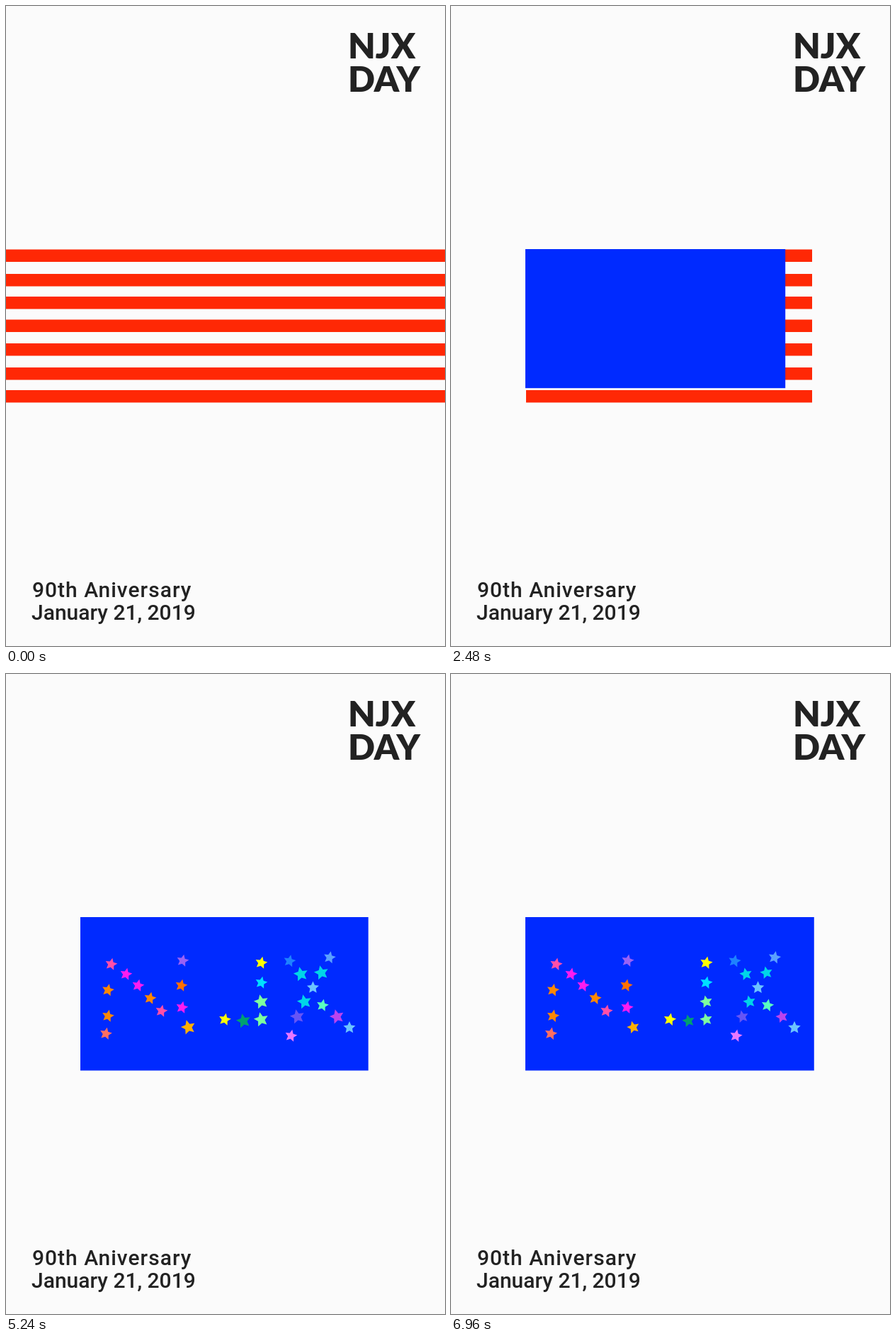
Recreate the animation shown at these times as an HTML page. Size 620 px wide and 903 px high, loop 7 s.

```html
<!DOCTYPE html>
<html lang="en">
<head>
<meta charset="utf-8">
<title>NJX Day</title>
<style>
  html, body { margin: 0; height: 100%; overflow: hidden; background: #fbfbfb; }
  svg { display: block; width: 620px; height: 903px; }
  text { fill: #222; }
  .title { font: 900 50px Lato, sans-serif; }
  .date { font: 500 30px Roboto, sans-serif; }
</style>
</head>
<body>
<svg viewBox="0 0 620 903">
  <g id="stripes" fill="#ff2805"></g>
  <rect id="field" x="105" y="343" fill="#002aff"/>
  <g id="stars"></g>
  <text class="title" x="483" y="74">NJX</text>
  <text class="title" x="483" y="121">DAY</text>
  <text class="date" x="37" y="834" letter-spacing="1">90th Aniversary</text>
  <text class="date" x="36" y="866">January 21, 2019</text>
</svg>
<script>
const LOOP = 7000, FRAME = 40;
const $ = id => document.getElementById(id);

function add(parent, tag, attrs) {
  const el = document.createElementNS('http://www.w3.org/2000/svg', tag);
  set(el, attrs);
  return parent.appendChild(el);
}
function set(el, attrs) {
  for (const key in attrs) el.setAttribute(key, attrs[key]);
}
// Eased progress from 0 to 1 between two times
function ease(t, from, to) {
  const p = Math.min(1, Math.max(0, (t - from) / (to - from)));
  return p * p * (3 - 2 * p);
}

const stripes = [343.5, 378, 410, 442.5, 476, 510, 542]
  .map(y => add($('stripes'), 'rect', { y, height: 17.5 }));

const starPoints = Array.from({ length: 10 }, (_, i) => {
  const r = i % 2 ? 0.48 : 1, a = i * Math.PI / 5;
  return [r * Math.sin(a), -r * Math.cos(a)].map(v => v.toFixed(3));
}).join(' ');

// Start time of each group of stars
const START = { early: 3072, main: 3240, late: 3940, last: 4095 };

const stars = [
  // N
  [148, 410, '#ff4fa8'], [143.5, 446.5, '#ff8800'], [143.5, 483, '#ff8800'], [140.5, 508, '#ff6f61'],
  [169, 424, '#ff1cf0'], [186, 440, '#ff1cf0'], [203, 458, '#ff8800'], [219, 476, '#ff4fa8'],
  [249, 405, '#9a62f5'], [247, 440, '#ff7000'], [248, 471, '#ff1cf0'], [257, 499, '#ffb000', 'last'],
  // J
  [360, 408, '#ffff00'], [360, 436, '#00e0ff'], [360, 463, '#7dff9e', 'late'],
  [360, 488, '#7dff9e', 'late'], [335, 490, '#00a070', 'late'], [308.5, 488, '#ffff00'],
  // X
  [400, 405.5, '#1e82ff'], [416, 424, '#00d5e8', 'late'], [433, 443, '#6cc4ff', 'early'],
  [446.5, 468, '#5affc0'], [467, 484, '#bb44ee', 'last'], [484.5, 499.5, '#6cc4ff', 'early'],
  [456.5, 400.5, '#5aa0ff'], [445, 422, '#00d5e8', 'late'], [421, 463, '#00d5e8', 'late'],
  [411, 484, '#6655f5', 'late'], [402, 511, '#e878ff']
].map(([x, y, fill, group = 'main']) => ({
  x, y, group, el: add($('stars'), 'polygon', { points: starPoints, fill })
}));

function drawStar({ x, y, group, el }, t) {
  const age = t - START[group];
  const size = 9.2 * (1.15 * ease(age, 0, 800) - 0.18 * ease(age, 1300, 2000) + 0.03 * ease(age, 2000, 3200));
  const sway = Math.cos((t - 5300) / 1750 * 2 * Math.PI);
  const angle = { early: 10 - 10 * sway, main: 12 * sway, late: -6 - 6 * sway, last: -10 - 5 * sway }[group];
  el.setAttribute('transform',
    `translate(${x + sway / 2} ${y - sway / 2}) rotate(${angle}) scale(${size})`);
}

function draw() {
  const now = performance.now() % LOOP;
  const t = now - now % FRAME;

  const trim = ease(t, 1120, 1900);
  stripes.forEach((el, i) => {
    const left = (i === 3 ? 107 : 106) * trim;
    set(el, { x: left, width: 620 - 110 * trim - left });
  });

  const grow = ease(t, 1280, 2760);
  const drift = Math.max(0, t - 2760) / 4240 * 2.6;
  set($('field'), { width: 405.2 * grow + drift, height: 216.5 * grow });
  $('stripes').style.display = grow < 1 ? '' : 'none';

  stars.forEach(star => drawStar(star, t));
  requestAnimationFrame(draw);
}
draw();
</script>
</body>
</html>
```
